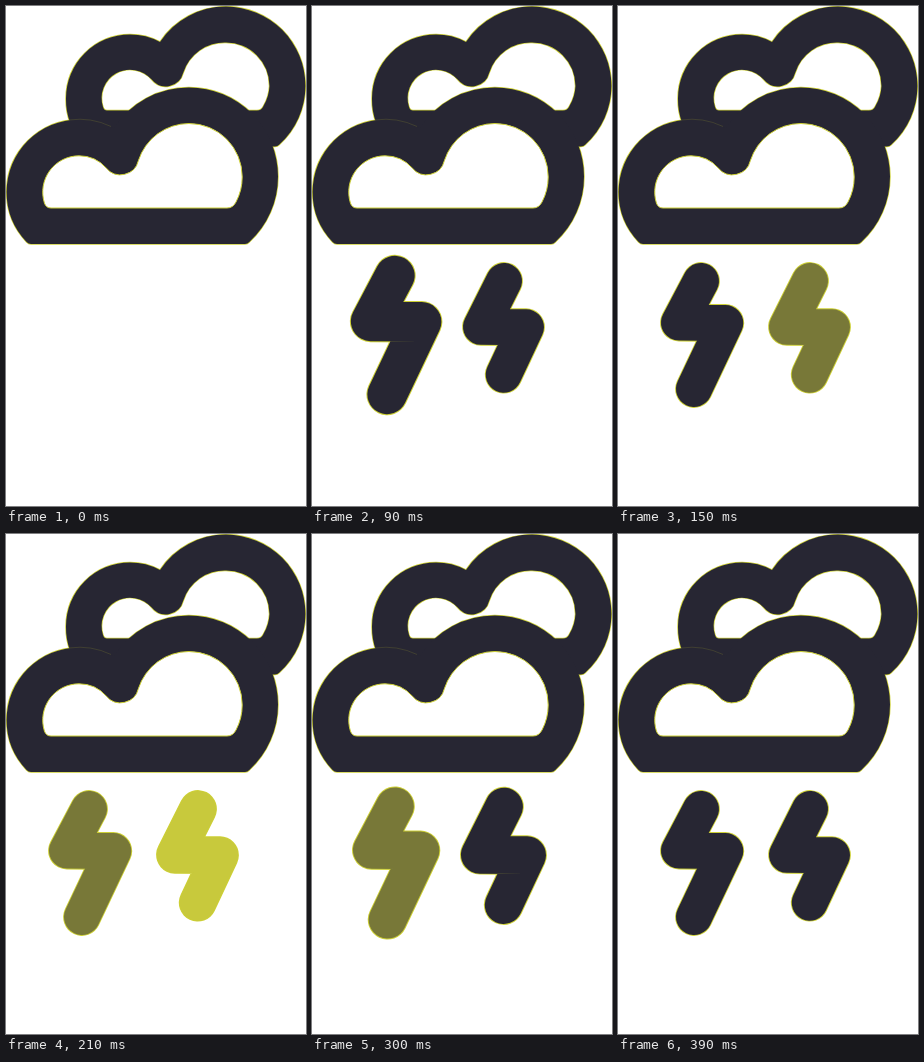
An HTML page for the animation above (900 ms loop, 300x500 px).

```html
<!DOCTYPE html>
<html lang="en">
<head>
<meta charset="utf-8">
<title>Thunderstorm</title>
<style>
  html, body { margin: 0; width: 100%; height: 100%; overflow: hidden; background: #fff; }
  svg { display: block; width: 300px; height: 500px; }
  .rim { fill: #cdd034; stroke: #cdd034; stroke-width: 1.4; fill-rule: evenodd; }
  .body { fill: #272633; fill-rule: evenodd; }
  .hole { fill: #fff; stroke: #cdd034; stroke-width: 1; }
  .seam { fill: none; stroke: #cdd034; stroke-width: .6; opacity: .25; }
  .bolt { fill: none; stroke-linecap: round; stroke-linejoin: round; }
  .bolt .edge { stroke: #cdd034; stroke-width: 37.8; }
  .bolt .core { stroke: #272633; stroke-width: 36; }
</style>
</head>
<body>
<svg viewBox="0 0 300 500">
  <defs>
    <path id="back" d="M82 140.5Q80 140.5 78 138A64 64 0 0 1 60 92.5A64 64 0 0 1 124 28.5A64 64 0 0 1 154 35.9
      A79.4 79.4 0 0 1 220 .6A79.4 79.4 0 0 1 299.4 80A79.4 79.4 0 0 1 273.4 138.5Q271.5 140.5 269 140.5Z
      M101 104.5Q98 104.5 97 101A28.5 28.5 0 0 1 145.7 73.6A18 18 0 0 0 177.2 66.8A43.5 43.5 0 0 1 220 36.5
      A43.5 43.5 0 0 1 263.5 80A43.5 43.5 0 0 1 257.5 100Q255.5 104.5 251 104.5Z"/>
    <path id="front" d="M25 238Q22.5 238 20.6 236A72.4 72.4 0 0 1 .6 186A72.4 72.4 0 0 1 73 113.6A72.4 72.4 0 0 1 107.8 122.3
      A89 89 0 0 1 183 81.5A89 89 0 0 1 272 170.5A89 89 0 0 1 243.3 236Q241.5 238 239 238Z"/>
    <path id="left" d="M83 275L61 316.6L107.3 317L76 383"/>
    <path id="right" d="M192 275L169 320.8L214 321.2L191.7 368.7"/>
  </defs>
  <use href="#back" class="rim"/>
  <use href="#front" class="rim"/>
  <use href="#back" class="body"/>
  <use href="#front" class="body"/>
  <path class="hole" d="M45 202Q40 202 38.4 197A36.3 36.3 0 0 1 73 149.8A36.3 36.3 0 0 1 100.2 162A18.4 18.4 0 0 0 132.4 154.6
    A53.3 53.3 0 0 1 183 117.5A53.3 53.3 0 0 1 236.2 171A53.3 53.3 0 0 1 230 196Q227 202 221 202Z"/>
  <path class="seam" d="M63 114A73 73 0 0 1 105 120.5"/>
  <g class="bolt"><use href="#left" class="edge"/><use href="#left" class="core"/></g>
  <g class="bolt"><use href="#right" class="edge"/><use href="#right" class="core"/></g>
</svg>
<script>
const LOOP = 900, STEP = 30;
const DARK = [39, 38, 51], GLOW = [200, 201, 60];

// [age in ms, scale, glow]
const KEYS = [[0, 1.1, 0], [60, 1, 0], [180, 1, 1], [240, 1.1, 0], [300, 1, 0]];

const groups = document.querySelectorAll('.bolt');
const bolts = [
  { el: groups[0], start: 90, x: 84.2, y: 329.1 },
  { el: groups[1], start: 30, x: 191.8, y: 321.9 }
];

const mix = (a, b, k) => a + (b - a) * k;

function pose(age) {
  const i = KEYS.findIndex(key => key[0] > age);
  if (i < 0) return KEYS[KEYS.length - 1].slice(1);
  const a = KEYS[i - 1], b = KEYS[i];
  const k = (age - a[0]) / (b[0] - a[0]);
  return [mix(a[1], b[1], k), mix(a[2], b[2], k)];
}

function drawBolt({ el, start, x, y }, t) {
  const shown = t >= start;
  el.setAttribute('visibility', shown ? 'visible' : 'hidden');
  if (!shown) return;
  const [scale, glow] = pose(t - start);
  el.setAttribute('transform', `translate(${x} ${y}) scale(${scale}) translate(${-x} ${-y})`);
  const rgb = DARK.map((c, i) => Math.round(mix(c, GLOW[i], glow)));
  el.lastElementChild.style.stroke = `rgb(${rgb})`;
}

function draw(ms) {
  const t = Math.floor((ms % LOOP) / STEP) * STEP;
  bolts.forEach(bolt => drawBolt(bolt, t));
}

const origin = performance.now();
function tick() {
  draw(Math.max(0, performance.now() - origin));
  requestAnimationFrame(tick);
}
tick();
</script>
</body>
</html>
```
